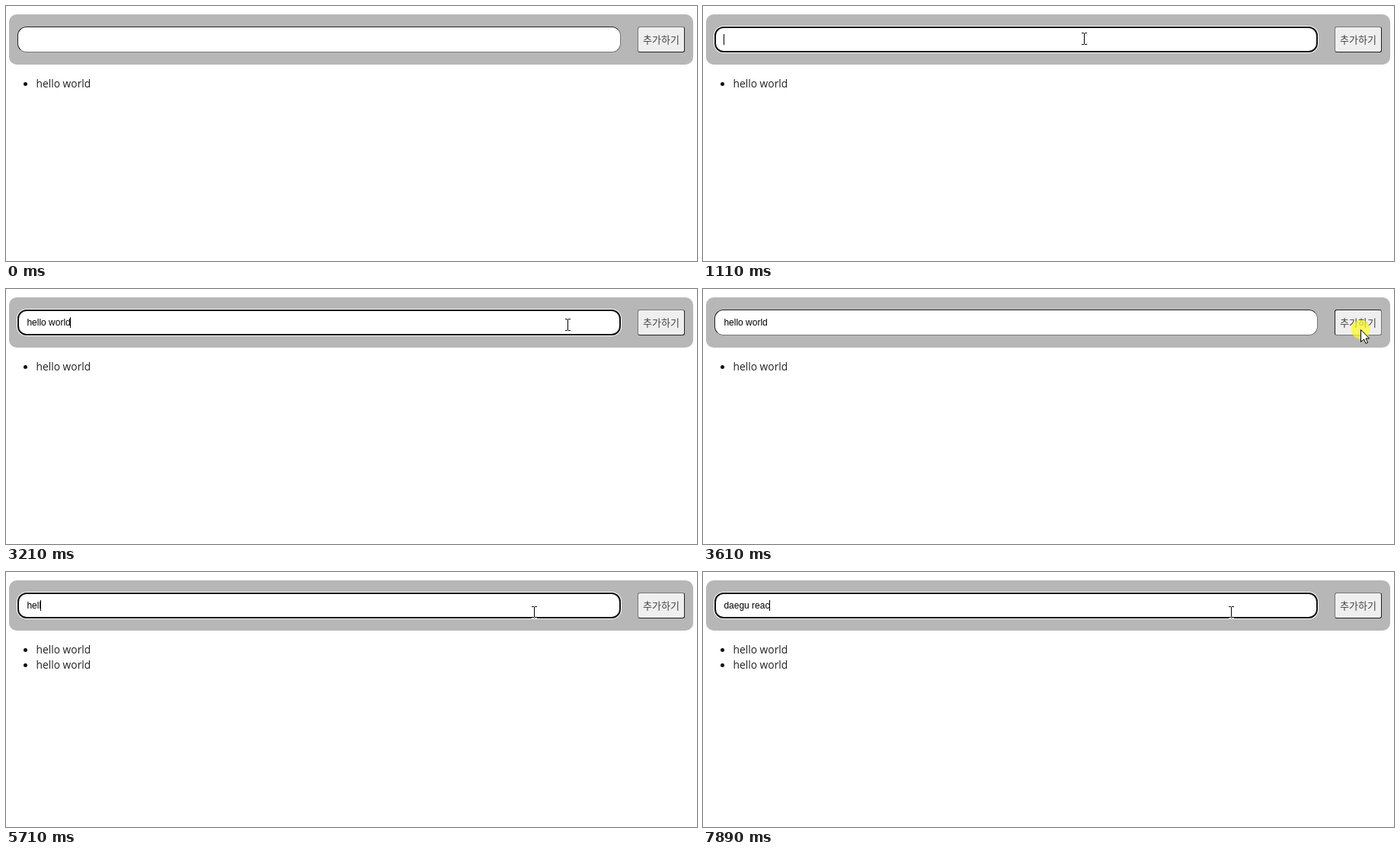
These frames come from a looping animation (907x335 px, 8 s). An HTML page:

```html
<!DOCTYPE html>
<html lang="ko">
<head>
<meta charset="utf-8">
<title>Todo input</title>
<style>
  html, body { margin: 0; width: 100%; height: 100%; overflow: hidden; background: #fff; }
  #stage { position: relative; width: 907px; height: 335px; overflow: hidden; background: #fff; isolation: isolate; }
  #stage * { position: absolute; box-sizing: border-box; }
  #bar { left: 4px; top: 11px; width: 898px; height: 66px; border-radius: 10px; background: #b7b7b7; }
  #field {
    left: 15px; top: 27px; width: 792px; height: 34px; border-radius: 12px; background: #fff;
    border: 1px solid; border-color: #222 #767676 #767676 #222;
  }
  #field.focus { border: 2px solid #101010; box-shadow: 0 0 0 1px #fff; }
  #text { left: 27.4px; top: 37px; white-space: pre; color: #000; font: 12px/14px "Liberation Sans", Arial, sans-serif; }
  #caret { top: 37px; width: 1px; height: 14px; background: #000; }
  #button {
    left: 829px; top: 27px; width: 62px; height: 34px; border-radius: 3px; background: #efefef;
    border: 1px solid; border-color: #767676 #222 #222 #767676;
    font: 300 13px/32px "Noto Sans CJK KR", "Noto Sans CJK", sans-serif; text-align: center; white-space: nowrap; color: #444;
  }
  #button.down { border-color: #222 #767676 #767676 #222; }
  .item { left: 39.5px; top: 92px; white-space: pre; color: #222; font: 13.8px/20px "Open Sans", "Noto Sans", sans-serif; }
  .item::before {
    content: ""; position: absolute; left: -16.5px; top: 7.5px; width: 5px; height: 5px;
    border-radius: 50%; background: #111;
  }
  #added { top: 112px; }
  #halo { width: 25px; height: 25px; margin: -12px; border-radius: 50%; background: rgba(252, 252, 30, .7); }
  svg { left: 0; top: 0; overflow: visible; }
  #beam { mix-blend-mode: difference; }
</style>
</head>
<body>
<div id="stage">
  <div id="bar"></div>
  <div id="field"></div>
  <div id="text"></div>
  <div id="caret"></div>
  <div id="button">추가하기</div>
  <div class="item">hello world</div>
  <div class="item" id="added">hello world</div>
  <div id="halo"></div>
  <svg id="beam" width="1" height="1" shape-rendering="crispEdges">
    <path fill="#fff" d="M-3-8h3v1h-3zM1-8h3v1h-3zM0-7h1v14h-1zM-3 7h3v1h-3zM1 7h3v1h-3z"/>
  </svg>
  <svg id="arrow" width="1" height="1">
    <path fill="#fff" stroke="#000" d="M.5.5V16.5L4.5 13L7 18.5L9.5 17.5L7 12H11.5Z"/>
  </svg>
</div>
<script>
const LOOP = 8000;
const STEP = 200 / 3; // pointer sampling interval
const CLICK = 70;
const ENTER = 170, FOCUS = 1040, LEAVE = 3080, PRESS = 3610, REFOCUS = 4090;
const $ = id => document.getElementById(id);
const within = (t, a, b) => t >= a && t < b;
const show = (el, on) => { el.style.visibility = on ? "visible" : "hidden"; };

// Each edit sets the content and restarts the caret blink
const edits = [];
let content = "";
function edit(t, text) {
  content = text;
  edits.push({ t, text });
}
function type(keys, start, end) {
  const gap = (end - start) / (keys.length - 1);
  [...keys].forEach((key, i) => edit(start + i * gap, content + key));
}
function erase(start, end) {
  const gap = (end - start) / (content.length - 1);
  for (let t = start; content; t += gap) edit(t, content.slice(0, -1));
}
edit(0, "");
edit(FOCUS + 50, "");
type("hell", 1730, 2050);
type("o wo", 2250, 2460);
type("rld", 2600, 2730);
edit(REFOCUS + 40, content);
erase(4760, 6230);
type("dae", 6490, 6690);
type("gu ", 6890, 7220);
type("re", 7420, 7490);
type("ac", 7690, 7890);

const spots = { corner: [695, 226], middle: [500, 43], button: [863, 53], end: [693, 53] };
const glides = [
  { start: ENTER, stop: 970, from: spots.corner, to: spots.middle },
  { start: 3013, stop: 3500, from: spots.middle, to: spots.button },
  { start: 3680, stop: 4020, from: spots.button, to: spots.end }
];

// Across slows down on arrival, down moves evenly
function pointer(t) {
  const origin = t < LEAVE ? ENTER : LEAVE;
  const s = Math.max(ENTER, origin + Math.floor((t + 5 - origin) / STEP) * STEP);
  const { start, stop, from, to } = glides.filter(g => g.start <= s).pop();
  const u = Math.min(1, (s - start) / (stop - start));
  const ease = 1 - (1 - u) ** 2;
  return [
    Math.round(from[0] + (to[0] - from[0]) * ease),
    Math.round(from[1] + (to[1] - from[1]) * u)
  ];
}

function draw(t) {
  const last = edits.filter(e => e.t <= t).pop();
  const focus = within(t, FOCUS, PRESS) || t >= REFOCUS;
  const blink = Math.floor((t - last.t) / 500) % 2 === 0;
  $("field").className = focus ? "focus" : "";
  $("text").textContent = last.text;
  $("caret").style.left = Math.floor(27 + $("text").getBoundingClientRect().width) + "px";
  show($("caret"), focus && blink);

  $("button").className = within(t, PRESS, PRESS + CLICK) ? "down" : "";
  show($("added"), t >= PRESS + CLICK);

  const [x, y] = pointer(t);
  const inField = within(x, 15, 807) && within(y, 27, 61);
  for (const id of ["halo", "beam", "arrow"]) $(id).style.transform = `translate(${x}px, ${y}px)`;
  show($("beam"), t >= ENTER && inField);
  show($("arrow"), t >= ENTER && !inField);
  show($("halo"), [FOCUS, PRESS, REFOCUS].some(c => within(t, c, c + CLICK)));
}

const begin = performance.now();
function tick() {
  draw((performance.now() - begin) % LOOP);
  requestAnimationFrame(tick);
}
tick();
</script>
</body>
</html>
```
